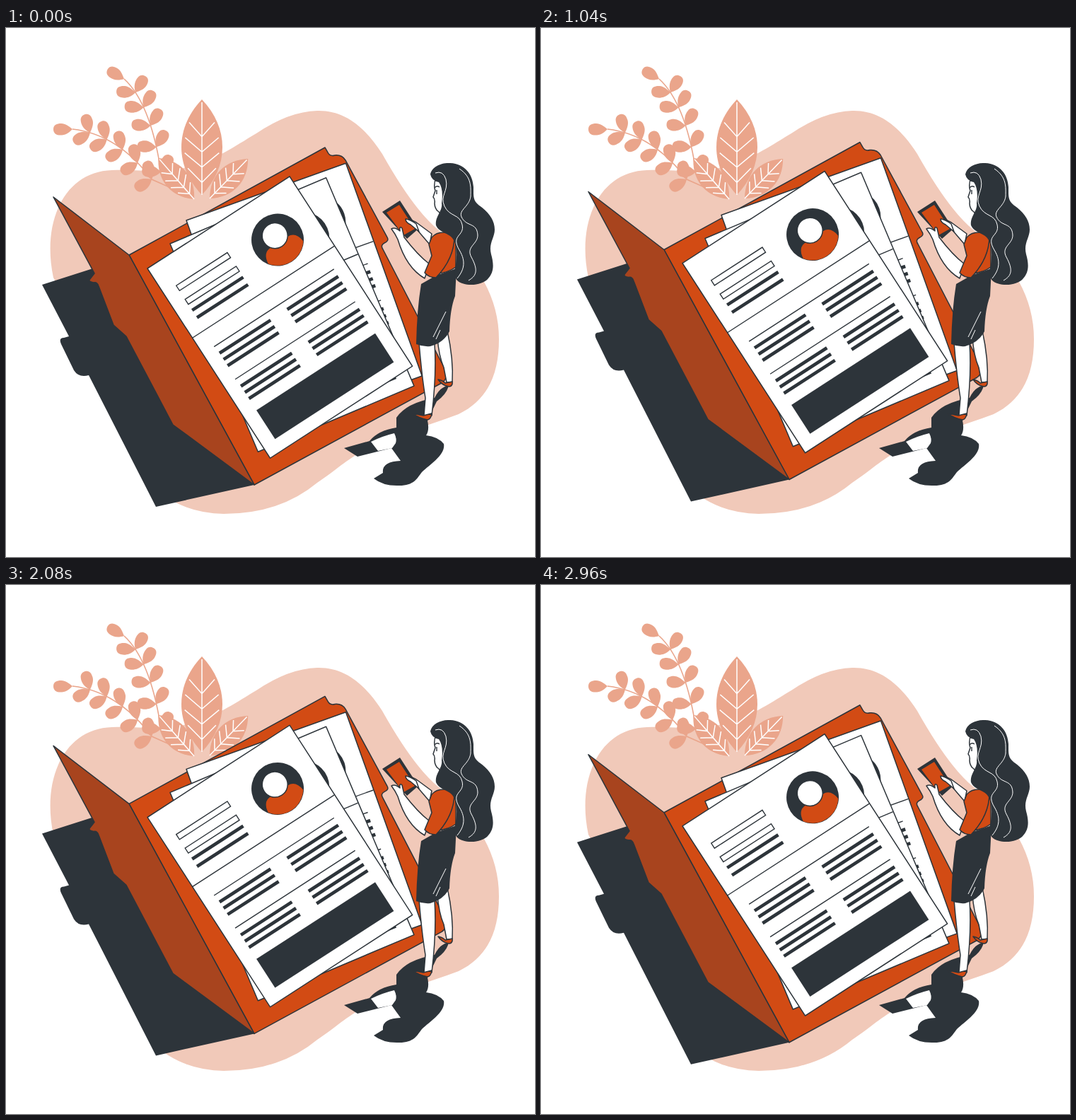
An HTML page that plays this animation: 748x748 px, repeating every 3000 ms.

```html
<!DOCTYPE html>
<html lang="en">
<head>
<meta charset="utf-8">
<title>Floating folder</title>
<style>
html, body { margin: 0; width: 100%; height: 100%; overflow: hidden; background: #fff; }
svg { display: block; width: 100vw; height: 100vh; }
.dark { fill: #2d343a; }
.orange { fill: #d24b14; }
.brown { fill: #a8441e; }
.pink { fill: #eaa58b; }
.pale { fill: #f1c9b9; }
.white { fill: #fff; }
.ink { stroke: #2d343a; stroke-width: 1.5; stroke-linejoin: round; }
.line, .bar, .vein, .stem, .strand { fill: none; }
.line { stroke: #2d343a; stroke-width: 1.4; }
.bar { stroke: #2d343a; stroke-width: 4.7; }
.vein { stroke: #fff; stroke-width: 1.5; }
.strand { stroke: #fff; stroke-width: 1; }
.stem { stroke: #eaa58b; stroke-width: 1.6; }
</style>
</head>
<body>
<svg viewBox="0 0 748 748">
  <defs>
    <g id="paper">
      <path class="white ink" d="M0 0H239.500V319.500H0Z"/>
      <circle class="dark" cx="176.500" cy="66" r="37"/>
      <path class="orange" d="M147 87Q149 70 162 70H191Q204 70 206 87A36 36 0 0 1 147 87Z"/>
      <circle class="white ink" cx="176.500" cy="59" r="18"/>
      <path class="line" d="M21 42.500h86v8.500h-86ZM21 65.500h86v8.500h-86ZM0 117H239M19 144H221M19 199H221"/>
      <path class="dark" d="M20.500 252h200v48.500h-200Z"/>
    </g>
  </defs>

  <path class="pale" d="M440 117C478 116 507 139 532 178Q577 258 612 286Q697 354 697 440C697 490 681 526 640 546Q600 561 562 572C488 600 478 618 440 643Q387 687 308 687Q258 686 222 660L165 530L67 353C50 273 83 203 150 201C190 199 215 207 255 197C296 187 322 168 354 149Q400 118 440 117Z"/>
  <g id="plant"></g>

  <g id="folder">
    <path class="dark" d="M51 363L126 339L240 450L351 646L212 677L117 491Q103 495 96 484L78 447Q74 438 82 438L89 436Z"/>
    <path class="orange ink" d="M174 321L451 169L455 176Q458 182 465 180Q475 179 480 187L539 296Q542 301 535 304Q529 307 533 313L621 483Q626 495 616 502L351 646Z"/>
    <path class="brown ink" d="M67 239L174 321L351 646L236 561L170 436L152 420L131 365Q129 359 124 360Q117 359 118 356L125 347Z"/>
    <use href="#paper" transform="translate(255 272) rotate(-19.700)"/>
    <use href="#paper" transform="translate(232 305) rotate(-22.900)"/>
    <use href="#paper" transform="translate(200 340) rotate(-32.900)"/>
  </g>

  <g id="shade">
    <path class="dark" d="M626 505Q624 517 609 528L596 555Q599 569 594 576Q611 578 619 588C622 603 600 617 588 628C581 637 577 647 556 647Q534 648 520 637L533 629Q531 613 558 612L545 594L497 606L478 594L514 584Q526 569 552 565V551Q566 530 606 523Q613 508 626 505Z"/>
    <path class="white" d="M516 585Q532 577 549 573Q553 581 551 587L546 594L526 598Z"/>
  </g>

  <g id="woman">
    <path class="white ink" d="M610 438Q612 464 619 480L623 501H631Q633 469 624 428Z"/>
    <path class="orange ink" d="M611 497Q617 498 621 502L631 500Q632 506 627 507Q617 506 611 497Z"/>
    <path class="white ink" d="M584 445Q588 493 593 523L591 548H602Q609 490 606 446Z"/>
    <path class="orange ink" d="M575 545L590 548L602 545Q601 553 596 554Q583 551 575 545Z"/>
    <path class="dark" d="M587 362L608 350L637 340L635 379Q628 397 627 429Q619 445 600 450Q590 451 580 447Q581 398 587 362Z"/>
    <path class="strand" d="M604 437L622 401M608 440L614 427"/>
    <path class="white ink" d="M602 291L583 277Q575 271 566 270Q565 273 575 278L599 306Z"/>
    <path class="dark" d="M532 260L557 244L583 284L567 298Z"/>
    <path class="orange" d="M538 261L556 250L578 284L562 293Z"/>
    <path class="white ink" d="M545 284Q551 292 554 299Q566 339 592 354L599 334Q582 321 563 296L560 283Q556 279 557 287Q550 281 545 284Z"/>
    <path class="white ink" d="M565 270Q572 271 580 277L584 288L572 278Q565 275 565 270Z"/>
    <path class="orange ink" d="M610 347L618 300L636 300V338Q625 346 610 347Z"/>
    <path class="orange ink" d="M602 296Q609 288 621 289L634 294Q634 326 608 353Q598 353 592 346L602 322L598 306Z"/>
    <path class="white ink" d="M608 212Q604 222 607 230L604 239Q607 242 606 248Q606 256 612 260L621 270L628 230Z"/>
    <path class="line" d="M609 229V235M606 226Q609 222 613 225"/>
    <path class="dark" d="M600 207C602 196 616 190 628 191C649 192 660 207 661 225C661 240 660 245 672 253C684 262 691 273 691 285C691 297 682 304 686 320C690 334 690 345 682 354C673 365 648 366 638 357Q632 350 636 334Q639 315 634 302C629 289 613 291 608 279C606 267 618 258 616 248Q619 228 612 218Q602 216 600 207Z"/>
    <path class="strand" d="M607 205Q618 201 622 214C626 231 613 237 620 252C627 267 642 263 645 278C649 295 628 292 641 314C652 332 646 344 638 354M641 199C659 211 657 225 657 238C655 253 640 257 644 267C651 282 666 274 667 293C667 306 650 309 658 324C669 344 664 351 654 357"/>
  </g>
</svg>
<script>
const $ = id => document.getElementById(id);

function add(parent, kind, d, transform = "") {
  const path = document.createElementNS("http://www.w3.org/2000/svg", "path");
  path.setAttribute("class", kind);
  path.setAttribute("d", d);
  path.setAttribute("transform", transform);
  parent.append(path);
}

// Text bars: two under the boxes, then two columns of two blocks
function bars(x, y, count, gap) {
  let d = "";
  for (let i = 0; i < count; i++) d += `M${x} ${y + i * gap}h86`;
  return d;
}
let text = bars(21, 84, 2, 12.5);
for (const x of [20.5, 134.5])
  for (const y of [156, 211.5]) text += bars(x, y, 3, 10.5);
add($("paper"), "bar", text);

const LEAFLET = "M0 0C7-8 14-9 19-8.500C25-8 27-4 27 0C27 6 22 8 16 8C10 8 5 4 0 0Z";

// A curved stem with a leaflet at its tip and pairs along it
function sprig([a, b, c, root], first, tip, sides) {
  add($("plant"), "stem", `M${a}Q${b} ${c}L${root}`);
  const leaflet = ([x, y], angle) =>
    add($("plant"), "pink", LEAFLET, `translate(${x} ${y}) rotate(${angle})`);
  leaflet(a, tip);
  for (let i = 0; i < 5; i++) {
    const t = first + i * 0.2, s = 1 - t;
    const point = [0, 1].map(k => s * s * a[k] + 2 * s * t * b[k] + t * t * c[k]);
    for (const angle of sides) leaflet(point, angle);
  }
}

// A pointed leaf with a midrib and slanted veins
function frond(x, y, length, half, angle) {
  const place = `translate(${x} ${y}) rotate(${angle})`;
  const w = half * 4 / 3, low = -0.3 * length, high = -0.7 * length;
  add($("plant"), "pink",
    `M0 0C${-w} ${low} ${-w} ${high} 0 ${-length}C${w} ${high} ${w} ${low} 0 0Z`, place);
  let d = `M0 0V${-0.97 * length}`;
  for (let i = 0; i < 4; i++) {
    const from = 0.13 + 0.16 * i, to = from + 0.15;
    const reach = 3.4 * half * to * (1 - to);
    d += `M${-reach} ${-to * length}L0 ${-from * length}L${reach} ${-to * length}`;
  }
  add($("plant"), "vein", d, place);
}

sprig([[167, 72], [203, 105], [218, 196], [226, 214]], 0.24, 211, [184, -58]);
sprig([[94, 143], [158, 150], [206, 214], [265, 240]], 0.2, 180, [151, -105]);
frond(277, 236, 135, 29, 0);
frond(266, 242, 77, 17, -41);
frond(288, 241, 78, 17, 44);

// Linear float: up for half of each period, then down
const PERIOD = 1500, LIFT = 14.96, LEAD = 1000 / 24;
const start = performance.now();
function draw(now) {
  const phase = (Math.max(0, now - start) + LEAD) % PERIOD / PERIOD;
  const rise = 1 - Math.abs(1 - 2 * phase);
  $("folder").setAttribute("transform", `translate(0 ${0.83 - LIFT * rise})`);
  requestAnimationFrame(draw);
}
draw(start);
</script>
</body>
</html>
```
